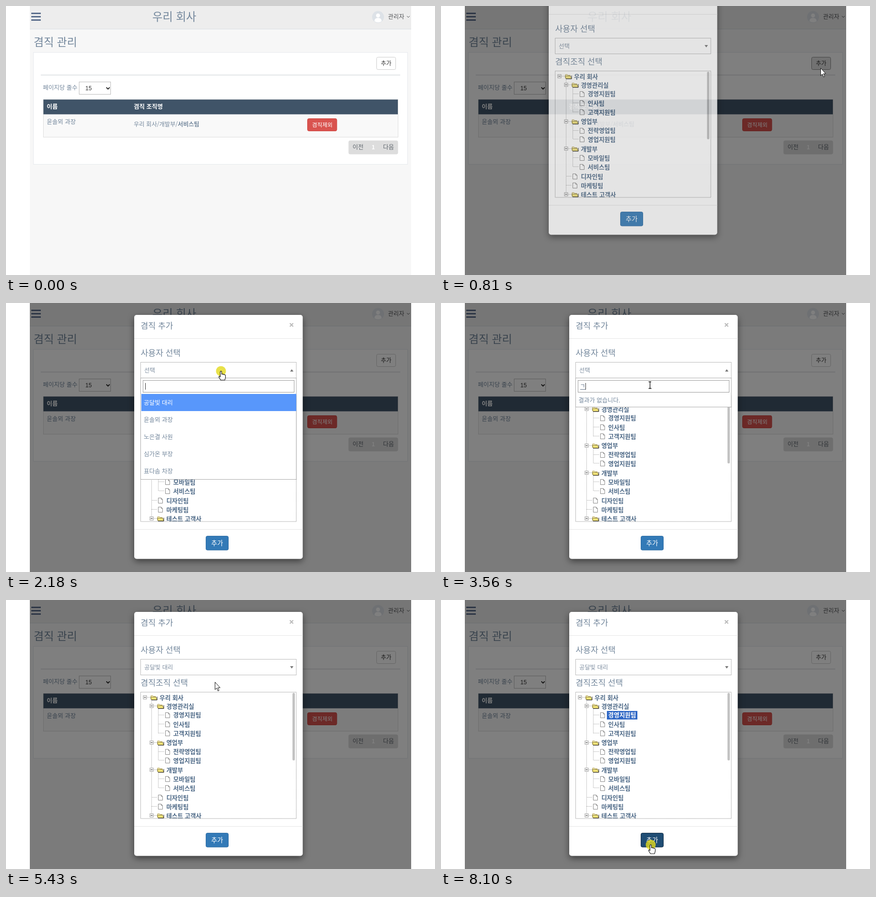
Recreate the animation shown at these times as an HTML page. Size 900 by 565 pixels, loop 8830 ms.

```html
<!DOCTYPE html>
<html lang="ko">
<head>
<meta charset="utf-8">
<style>
html, body { margin: 0; width: 100%; height: 100%; overflow: hidden; background: #fff; }
svg { display: block; }
text { font-family: "Noto Sans CJK KR", "Noto Sans CJK", "Noto Sans KR", sans-serif; white-space: pre; }
.num { font-family: "Liberation Sans", Arial, sans-serif; }
#sheet { filter: drop-shadow(0 5px 7px rgba(0,0,0,.5)); }
</style>
</head>
<body>
<svg id="stage" width="900" height="565" viewBox="0 0 900 565"></svg>
<script>
const LOOP = 8830, SLATE = '#73879c', LINK = '#4c6886';
const MEMBERS = ['공달빛 대리', '윤솔뫼 과장', '노은결 사원', '심가온 부장', '표다솜 차장'];

// level, centre y, label, is folder
const TREE = [
  [0, 205, '우리 회사', 1], [1, 223, '경영관리실', 1], [2, 241.5, '경영지원팀'],
  [2, 261, '인사팀'], [2, 280, '고객지원팀'], [1, 299.5, '영업부', 1],
  [2, 318.5, '전략영업팀'], [2, 337, '영업지원팀'], [1, 357, '개발부', 1],
  [2, 376, '모바일팀'], [2, 395, '서비스팀'], [1, 415, '디자인팀'],
  [1, 434, '마케팅팀'], [1, 453, '테스트 고객사', 1]
];

// time, typed text, number of results
const TYPING = [
  [0, '', 5], [3560, 'ㄱ', 0], [3690, 'ㄱ', 5], [3890, '고', 0], [4020, '공', 1],
  [4220, '공ㄷ', 1], [4420, '공다', 0], [4630, '공달', 1], [4830, '공달ㅂ', 1], [5030, '공달비', 0]
];

const easeIn = p => p * p, easeOut = p => 1 - (1 - p) ** 2;
const easeBoth = p => p * p * (3 - 2 * p);

// pointer moves: start, end, from, to, easing
const MOVES = [
  [1000, 1230, [796, 130], [707, 182], easeIn],
  [1230, 1780, [707, 182], [451, 143], easeOut],
  [2250, 2600, [451, 143], [438, 172], easeBoth],
  [6420, 6680, [437, 172], [390, 237], easeBoth],
  [7280, 8000, [390, 237], [440, 514], easeBoth]
];
const PRESSES = [[400, 530], [2110, 2250], [2760, 2830], [6820, 7090], [8100, LOOP]];

const text = (x, cy, size, fill, str, attrs = '') =>
  `<text x="${x}" y="${cy + size * .38}" font-size="${size}" fill="${fill}" ${attrs}>${str}</text>`;
const box = (x, y, w, h, fill, stroke, r = 0, attrs = '') => {
  const d = stroke ? .5 : 0;
  return `<rect x="${x + d}" y="${y + d}" width="${w - 2 * d}" height="${h - 2 * d}" rx="${r}"
    fill="${fill}" stroke="${stroke || 'none'}" ${attrs}/>`;
};
const path = (d, stroke, width = 1, attrs = 'fill="none"') =>
  `<path d="${d}" stroke="${stroke}" stroke-width="${width}" ${attrs}/>`;
const group = (id, body, attrs = '') => `<g id="${id}" ${attrs}>${body}</g>`;
const BOLD = 'font-weight="700"', MEDIUM = 'font-weight="500"', LIGHT = 'font-weight="300"';

function page() {
  return box(50, 0, 800, 565, '#f7f7f7')
    + box(50, 0, 800, 48, '#ededed') + box(50, 48, 800, 1, '#d9dee4')
    + [14, 21, 28].map(y => box(53, y, 20, 3, '#5a6d8c')).join('')
    + text(307, 22, 23.3, SLATE, '우리 회사', LIGHT)
    + '<circle cx="780.5" cy="23" r="12.5" fill="#dde2e7"/>'
    + '<circle cx="780.5" cy="20" r="4.2" fill="#fff"/><path d="M773 32q0-7 7.5-7t7.5 7q-7 5-15 0" fill="#fff"/>'
    + text(801.5, 22, 12.3, '#515356', '관리자')
    + path('M841 21l3 3 3-3', '#515356')
    + text(58, 75.5, 23, SLATE, '겸직 관리', LIGHT)
    + box(57, 97, 786, 236, '#fff', '#e6e9ed')
    + box(777, 107, 41, 27, '#fff', '#ccc', 3, 'id="addTop"')
    + text(786.5, 120, 12, '#333', '추가')
    + box(73, 144, 754, 2, '#e3e5e8')
    + text(77.5, 171, 12.5, SLATE, '페이지당 줄수')
    + box(153, 159, 67, 27, '#fff', '#bbb')
    + text(166.5, 172, 12, '#333', '15', 'class="num"')
    + path('M210.5 171l3.5 3.5 3.5-3.5', '#222', 1.8)
    + box(78, 196, 745, 80, '#f9f9f9', '#ddd') + box(78.5, 196.5, 743.5, 31, '#405468')
    + text(85.5, 211, 12.5, '#fff', '이름', BOLD)
    + text(268, 211, 12.5, '#fff', '겸직 조직명', BOLD)
    + text(85.5, 243.5, 12.5, SLATE, MEMBERS[1])
    + text(268, 248, 12.3, SLATE, `우리 회사/개발부/<tspan ${BOLD}>서비스팀</tspan>`)
    + box(632, 236, 62.5, 27, '#d9534f', '#d0453f', 3)
    + text(642, 249.5, 11.7, '#fff', '겸직제외', MEDIUM)
    + box(718.5, 282.5, 104, 29, '#ddd', '', 4)
    + text(727, 296, 12.5, '#5f666e', '이전') + text(791, 296, 12.5, '#5f666e', '다음')
    + text(767, 296, 12, '#fff', '1', BOLD);
}

function treeNode([level, y, label, folder], i) {
  const gx = Math.round(291 + 14.3 * level) + .5, gy = Math.round(y) - .5;
  const ix = gx + 11.5;
  let s = path(`M${gx} ${gy}h11`, '#999', 1, 'stroke-dasharray="1 1"');
  if (folder) {
    s += box(gx - 4, gy - 4, 8, 8, '#fff', '#999') + path(`M${gx - 2} ${gy}h4`, '#222')
      + path(`M${ix + 1} ${gy + 4.5}v-8h4l1 1.5h5v2`, '#a8964a', 1, 'fill="#fff6bd"')
      + path(`M${ix + 2} ${gy + 5}l-1.5-5.5h11l2.5 5.5z`, '#7d7030', 1, 'fill="#f6e77c"')
      + path(`M${ix + 2} ${gy + 5.5}h12v-7`, '#222');
  } else {
    s += path(`M${ix + 2.5} ${gy - 5}h6l3 3v8h-9zm6 0v3h3`, '#8a8a8a', 1, 'fill="#fff"');
  }
  const own = label === '경영지원팀';
  if (own) s += box(348, 233, 64, 18, 'none', '', 0, 'id="pick"');
  return s + text(322 + 14.4 * level, y, 12.7, LINK, label, BOLD + (own ? ' id="pickText"' : ''));
}

function modal() {
  const stems = [[305.5, 210, 453], [319.5, 229, 280], [319.5, 305, 337], [319.5, 363, 395]];
  const rows = MEMBERS.map((name, i) => group('row' + i,
    (i ? '' : box(284, 191, 325, 36, '#5897fb'))
    + text(289, 209 + 36 * i, 12.5, i ? SLATE : '#fff', name))).join('');
  return box(269, 25, 353.5, 512.5, '#fff', '', 5, 'id="sheet"')
    + text(282.5, 47, 17.2, SLATE, '겸직 추가')
    + path('M595.5 42.5l7 7m0-7l-7 7', '#bbb', 2.2)
    + box(269, 74, 353.5, 1, '#e5e5e5') + box(269, 475, 353.5, 1, '#e5e5e5')
    + text(282.5, 104, 17.2, SLATE, '사용자 선택')
    + box(282, 124, 327.5, 34, '#fff', '#bbb')
    + text(290, 141, 12.4, '#7f8fa1', '', 'id="chosen"')
    + '<path id="arrowTip" fill="#777"/>'
    + text(282.5, 174, 17.1, SLATE, '겸직조직 선택')
    + '<svg x="283" y="194" width="326" height="265" viewBox="283 194 326 265">'
    + stems.map(([x, a, b]) => path(`M${x} ${a}V${b}`, '#999', 1, 'stroke-dasharray="1 1"')).join('')
    + TREE.map(treeNode).join('') + '</svg>'
    + box(282, 193, 327.5, 266.5, 'none', '#777', 0, 'stroke-dasharray="1 1"')
    + box(601, 195, 5, 142, '#c3c3c3', '', 2.5)
    + box(419, 489, 48, 30.5, '#337ab7', '#2e6da4', 3, 'id="addBottom"')
    + text(430.5, 504, 13.5, '#fff', '추가', MEDIUM)
    + group('drop', box(282, 157, 327.5, 62, '#fff', '#aaa', 0, 'id="dropBox"')
      + box(287, 162, 318, 26, '#fff', '#999')
      + text(291.5, 174.5, 12, '#5f7288', '', 'id="query"')
      + '<path id="underline" stroke="#5f7288"/><path id="caret" stroke="#333"/>'
      + group('none', text(288.5, 204.5, 12.5, SLATE, '결과가 없습니다.')) + rows);
}

const HAND = 'M-1.5 10V1.2Q0-1 1.5 1.2V6.5Q3 5.4 4.2 7Q5.8 6 7 7.8Q9.5 7 9.5 10V13.5L8 19H-.5L-4.5 12.5Q-4.5 9.5-1.5 12Z';
const cursors = group('press', '<circle r="10.5" fill="#e2da1c" opacity=".8"/>')
  + group('pointer', path('M.5.5V16.2L4 13l2.6 6 2.4-1-2.6-5.8h4.8z', '#111', 1, 'id="arrow" fill="#fff"')
    + path(HAND, '#111', 1.1, 'id="hand" fill="#fff"')
    + path('M-2.5-6.5h2.5h3M.5-6.5V7.5M-2.5 7.5h6', '#111', 1.3, 'id="beam" fill="none"'));

document.getElementById('stage').innerHTML = page()
  + box(50, 0, 800, 565, '#000', '', 0, 'id="shade"') + group('modal', modal()) + cursors;

const $ = id => document.getElementById(id);
const set = (id, attrs) => { for (const k in attrs) $(id).setAttribute(k, attrs[k]); };
const show = (id, on) => set(id, { display: on ? 'inline' : 'none' });
const clamp = v => Math.min(1, Math.max(0, v));
const inside = (x, y, l, t, r, b) => x >= l && x <= r && y >= t && y <= b;

function pointerAt(t) {
  let pos = MOVES[0][2];
  for (const [start, end, from, to, ease] of MOVES) {
    if (t < start) break;
    const p = ease(clamp((t - start) / (end - start)));
    pos = from.map((v, i) => v + (to[i] - v) * p);
  }
  return pos;
}

function drawDropdown(t) {
  const open = t >= 2180 && t < 5430;
  show('drop', open);
  set('arrowTip', { d: open ? 'M596 144h7l-3.5-5z' : 'M596 139h7l-3.5 5z' });
  $('chosen').textContent = t < 5430 ? '선택' : MEMBERS[0];
  const [, typed, count] = TYPING.filter(s => s[0] <= t).pop();
  const end = 292 + typed.length * 11.04;
  $('query').textContent = typed;
  set('underline', { d: typed ? `M${end - 11} 181.5H${end}` : '' });
  set('caret', { d: `M${Math.floor(end) + .5} 168V182` });
  show('caret', t < 3160 || t >= 3560);
  set('dropBox', { height: (count ? 191 + 36 * count : 219) - 158 });
  show('none', !count);
  MEMBERS.forEach((_, i) => show('row' + i, i < count));
}

function draw(t) {
  const [x, y] = pointerAt(t);
  const fade = clamp((t - 685) / 158), rest = (1 - clamp((t - 685) / 300)) ** 1.5;
  set('shade', { opacity: .5 * clamp((t - 540) / 150) });
  set('modal', {
    opacity: fade,
    transform: `translate(${Math.round(-97 * rest)} ${Math.round(-128 * rest)})`
  });
  show('modal', fade > 0);

  const lit = t >= 70 && t < 900;
  set('addTop', { fill: lit ? '#e6e6e6' : '#fff', stroke: lit ? '#8c8c8c' : '#ccc' });
  drawDropdown(t);

  const onPick = t > 6400 && inside(x, y, 348, 233, 412, 251);
  const active = t >= 6950;
  set('pick', {
    fill: active ? '#3169c6' : onPick ? '#f2f7fd' : 'none',
    stroke: !active && onPick ? '#b8d6fb' : 'none'
  });
  set('pickText', { fill: active ? '#fff' : LINK });

  const onAdd = t > 7000 && inside(x, y, 419, 489, 467, 519);
  const down = t >= 8100;
  set('addBottom', {
    fill: down ? '#204d74' : onAdd ? '#286090' : '#337ab7',
    stroke: down ? '#122b40' : onAdd ? '#204d74' : '#2e6da4'
  });

  const onSelect = t > 1230 && t < 5430 && inside(x, y, 283, 125, 609, 158);
  const beam = t > 2180 && t < 5430 && inside(x, y, 287, 162, 605, 187);
  const hand = onSelect || onPick || onAdd;
  show('beam', beam);
  show('hand', hand);
  show('arrow', !beam && !hand);
  show('pointer', t >= 70);
  show('press', PRESSES.some(([a, b]) => t >= a && t < b));
  for (const id of ['pointer', 'press']) set(id, { transform: `translate(${x} ${y})` });
}

function tick() {
  draw(performance.now() % LOOP);
  requestAnimationFrame(tick);
}
tick();
</script>
</body>
</html>
```
